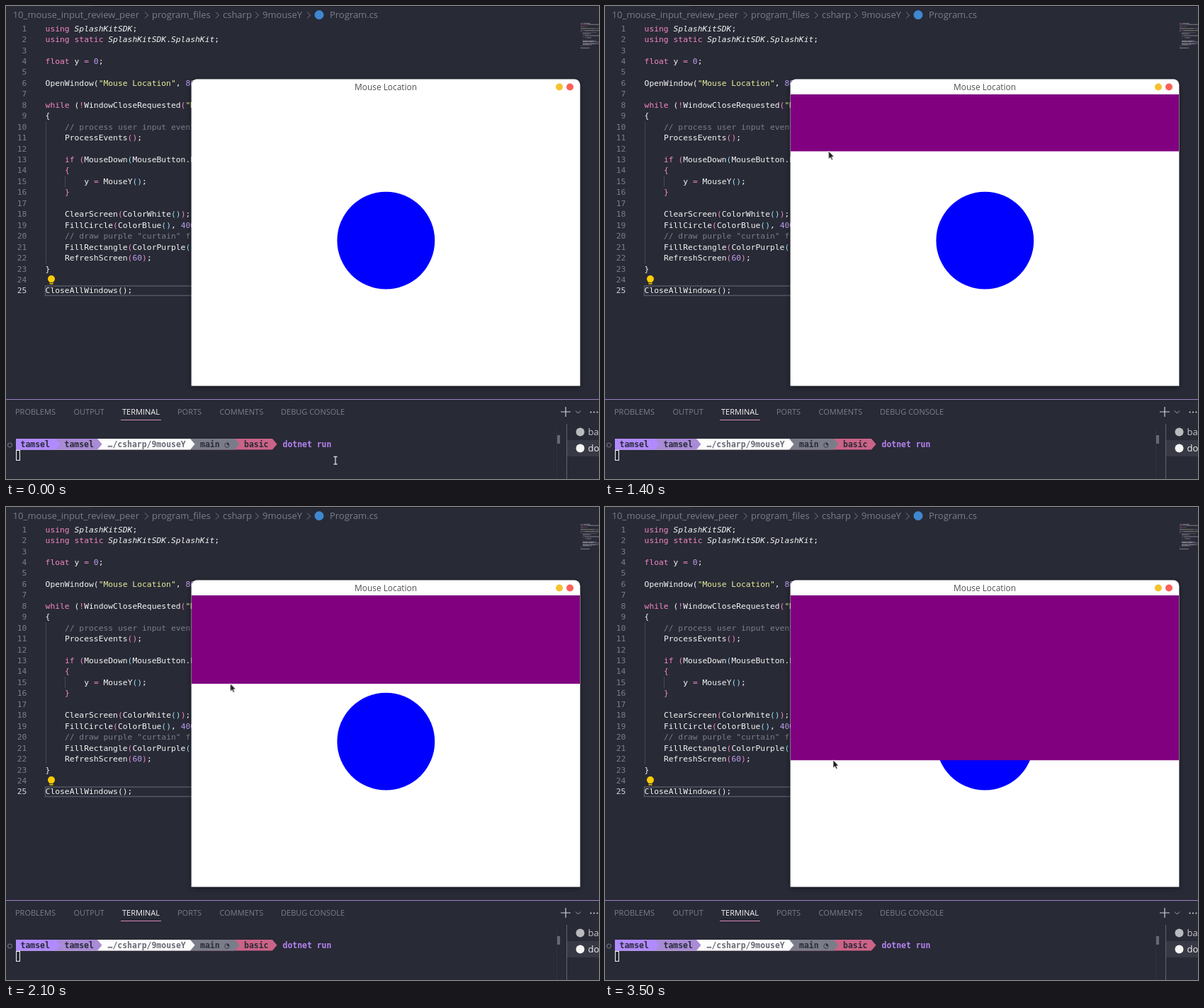
An HTML page that plays this animation: 837 px wide and 669 px high, repeating every 4200 ms.

```html
<!DOCTYPE html>
<html lang="en">
<head>
<meta charset="utf-8">
<title>Mouse Location</title>
<style>
  html, body { margin: 0; width: 100%; height: 100%; overflow: hidden; background: #282a36; }
  svg { display: block; }
  text { white-space: pre; }
  .code { font: 11.34px "DejaVu Sans Mono", monospace; fill: #f6f6f4; }
  .num { fill: #7b7f8b; text-anchor: end; }
  .ui { font: 13px "Open Sans", "Noto Sans", sans-serif; fill: #7b7f8b; }
  .tab { font-size: 11px; }
  .term { font: bold 11.45px "DejaVu Sans Mono", monospace; }
  .line { fill: none; stroke: #7b7f8b; }
</style>
</head>
<body>
<svg id="stage" width="837" height="669" viewBox="0 0 837 669">
  <defs>
    <clipPath id="view"><rect x="262" y="125.6" width="548" height="411"/></clipPath>
    <filter id="shadow" x="-10%" y="-10%" width="120%" height="120%">
      <feDropShadow dx="0" dy="2" stdDeviation="4" flood-color="#000" flood-opacity=".45"/>
    </filter>
  </defs>
  <rect width="837" height="669" fill="#282a36"/>
  <rect x="120" width="717" height="1" fill="#1d1e27"/>

  <g id="crumbs"></g>
  <circle cx="442" cy="12.5" r="6.5" fill="#3f87cf"/>

  <path d="M56.5 163V364M83.5 240V256" stroke="#454752"/>
  <path d="M262 396H55.5V409.5H262" fill="none" stroke="#555865" stroke-width="1.4"/>
  <g id="editor"></g>
  <g id="minimap" opacity=".55"></g>
  <g>
    <circle cx="64" cy="386" r="5" fill="#ffcc00"/>
    <path d="M61.5 389h5v4.5h-5z" fill="#ffcc00"/>
    <path d="M61.5 391.5h5" stroke="#282a36"/>
  </g>

  <path d="M0 556.5H837" stroke="#9a82c0"/>
  <g id="tabs"></g>
  <path d="M162 585.5H219" stroke="#d58ab8"/>
  <path d="M783 574H797M790 567V581" stroke="#d0d0d2" stroke-width="1.2"/>
  <path class="line" d="M804 572.5l3.5 3.5 3.5-3.5" style="stroke:#a9aab0"/>
  <g fill="#d0d0d2">
    <circle cx="825.5" cy="574.5" r="1.1"/>
    <circle cx="830" cy="574.5" r="1.1"/>
    <circle cx="834.5" cy="574.5" r="1.1"/>
  </g>
  <rect x="777" y="607" width="5" height="12" fill="#666873"/>
  <path d="M777.5 598V669" stroke="#30323e"/>
  <rect x="792" y="614" width="45" height="23" fill="#373945"/>
  <path d="M791.5 591V669" stroke="#62646f"/>
  <circle cx="810.5" cy="602.5" r="6" fill="#b9babe"/>
  <circle cx="810.5" cy="625.5" r="6" fill="#f6f6f4"/>
  <g id="shells"></g>

  <circle class="line" cx="5.5" cy="621" r="3"/>
  <g id="prompt"></g>
  <rect x="14.5" y="628.5" width="5" height="14" fill="none" stroke="#f6f6f4"/>

  <path d="M261.7 537.2V111.5a8 8 0 0 1 8-8H802.3a8 8 0 0 1 8 8V537.2z" fill="#fff" filter="url(#shadow)"/>
  <text class="ui" x="536" y="118.5" text-anchor="middle" style="font-size:11.9px;fill:#505050">Mouse Location</text>
  <circle cx="781" cy="114.5" r="5" fill="#f5c22e"/>
  <circle cx="796" cy="114.5" r="5" fill="#fb6158"/>
  <circle cx="536.3" cy="331.7" r="68.9" fill="#00f"/>
  <g clip-path="url(#view)">
    <rect id="curtain" x="262" y="-287" width="548" height="412" fill="#800080"/>
  </g>
  <path id="pointer" d="M0 0V11.5L2.6 9.2 4.4 13 6.3 12.1 4.5 8.4H8z" fill="#1c1c1c" stroke="#fff" stroke-width=".8"/>
  <path id="beam" d="M462.5 637.5H467.5M462.5 648H467.5M465 637.5V648" stroke="#d8d8da" stroke-width="1.3"/>
</svg>
<script>
const $ = id => document.getElementById(id);

function add(parent, tag, attrs, text) {
  const el = document.createElementNS(parent.namespaceURI, tag);
  for (const key in attrs) el.setAttribute(key, attrs[key]);
  if (text !== undefined) el.textContent = text;
  parent.appendChild(el);
  return el;
}

// Editor
const source = `using SplashKitSDK;
using static SplashKitSDK.SplashKit;

float y = 0;

OpenWindow("Mouse Location", 800, 600);

while (!WindowCloseRequested("Mouse Location"))
{
    // process user input events
    ProcessEvents();

    if (MouseDown(MouseButton.LeftButton))
    {
        y = MouseY();
    }

    ClearScreen(ColorWhite());
    FillCircle(ColorBlue(), 400, 300, 100);
    // draw purple "curtain" from the top
    FillRectangle(ColorPurple(), 0, 0, 800, y);
    RefreshScreen(60);
}

CloseAllWindows();`.split("\n");

const PLAIN = "#f6f6f4", PINK = "#f286c4", PURPLE = "#bf9eee";
const BRACKETS = [PLAIN, PINK, "#97e1f1"];
const TOKENS = /(\/\/.*)|("[^"]*")|\b(using|static|float|while|if)\b|\b(\d+)|([!=])|([({])|([)}])|(SplashKit(?:SDK)?)|[^\w]|\w+/g;
let depth = 0;

function tokenColor([, comment, string, keyword, number, operator, open, close]) {
  if (comment) return "#7b7f8b";
  if (string) return "#e7ee98";
  if (keyword || operator) return PINK;
  if (number) return PURPLE;
  if (open) return BRACKETS[depth++ % 3];
  if (close) return BRACKETS[--depth % 3];
  return PLAIN;
}

source.forEach((line, i) => {
  const y = 35.6 + i * 15.45;
  const num = add($("editor"), "text", { class: "code num", x: 29.3, y }, i + 1);
  if (i === source.length - 1) num.style.fill = "#d5d5d6";
  const row = add($("editor"), "text", { class: "code", x: 55.6, y });
  for (const token of line.matchAll(TOKENS)) {
    const fill = tokenColor(token);
    const style = token[8] ? "italic" : "normal";
    add(row, "tspan", { fill, "font-style": style }, token[0]);
    if (token[0].trim()) {
      add($("minimap"), "rect", {
        x: 811 + token.index * 0.72, y: 24.3 + i * 1.44,
        width: token[0].length * 0.72, height: 0.8, fill
      });
    }
  }
});

// Labels
const labels = (id, cls, y, items) => items.forEach(([x, text, fill]) => {
  const el = add($(id), "text", { class: cls, x, y }, text);
  if (fill) el.style.fill = fill;
});

labels("crumbs", "ui", 17.3, [
  [9.7, "10_mouse_input_review_peer"], [206, "program_files"],
  [306, "csharp"], [362, "9mouseY"], [457, "Program.cs"]
]);
for (const x of [196, 296, 352, 425]) {
  add($("crumbs"), "path", { class: "line", d: `M${x} 8.5l4.5 4.5-4.5 4.5` });
}
labels("tabs", "ui tab", 578, [
  [13, "PROBLEMS"], [95.5, "OUTPUT"], [164, "TERMINAL", PLAIN],
  [242, "PORTS"], [301.5, "COMMENTS"], [388, "DEBUG CONSOLE"]
]);
labels("shells", "ui", 606.8, [[821.5, "bash", "#c8c8cb"]]);
labels("shells", "ui", 629.8, [[821.5, "dotnet", PLAIN]]);

// Prompt: each arrow overlaps the start of the next block
const blocks = [
  [70, "#b08aff"], [129, "#a98bd6"], [260, "#fdfdfd"], [323, "#7a7d89"], [376, "#cb6387"]
];
for (const [end, fill] of blocks.reverse()) {
  add($("prompt"), "path", { d: `M14 612H${end}L${end + 6.5} 619.8 ${end} 627.6H14z`, fill });
}
labels("prompt", "term", 624, [
  [20.5, "tamsel", "#282a36"], [82.5, "tamsel", "#282a36"],
  [143.5, "…/csharp/9mouseY", "#666974"], [274, "main ◔", "#282a36"],
  [336, "basic", "#282a36"], [390.5, "dotnet run", "#b583f0"]
]);

// Each pose holds for one step: curtain edge and pointer x (null while hidden)
const STEP = 700;
const poses = [[125, null], [158, 319.5], [205.5, 315.5], [250, 316.5], [309.5, 321.5], [358.2, 322]];

function play(id, pose) {
  const frames = poses.map((p, i) => ({ ...pose(p), offset: i / poses.length, easing: "steps(1, end)" }));
  frames.push({ ...pose(poses[poses.length - 1]), offset: 1 });
  $(id).animate(frames, { duration: STEP * poses.length, iterations: Infinity });
}

play("curtain", ([edge]) => ({ transform: `translateY(${edge - 125}px)` }));
play("pointer", ([edge, x]) => ({
  transform: `translate(${x ?? 0}px, ${edge - 0.5}px)`, opacity: x === null ? 0 : 1
}));
play("beam", ([, x]) => ({ opacity: x === null ? 1 : 0 }));
</script>
</body>
</html>
```
